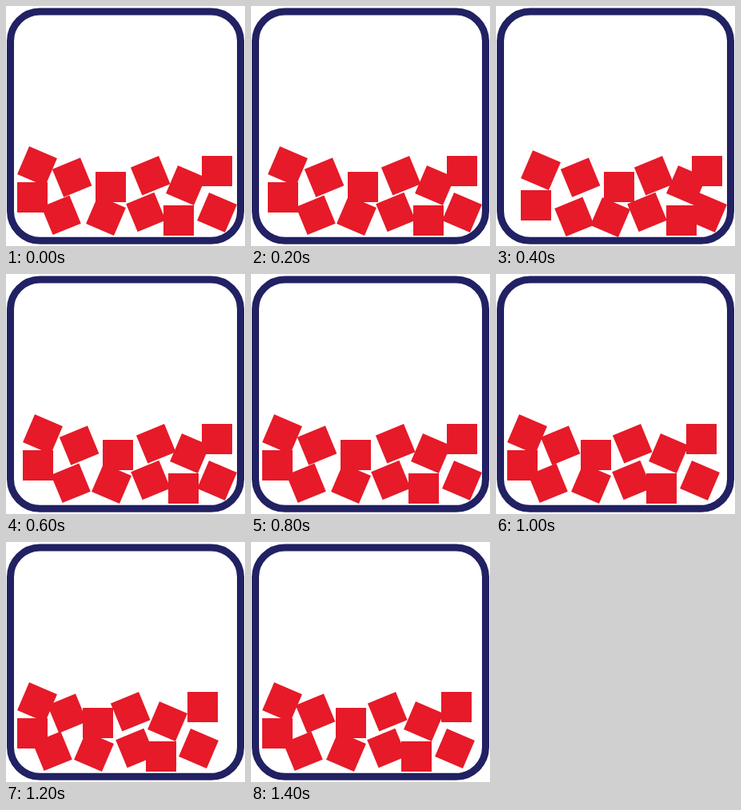
An HTML page for the animation above (1.6 s loop, 299 by 301 pixels).

```html
<!DOCTYPE html>
<html lang="en">
<head>
<meta charset="utf-8">
<title>Sliding boxes</title>
<style>
html, body { margin: 0; width: 100%; height: 100%; overflow: hidden; background: #fff; }
svg { display: block; width: 100vw; height: 100vh; }
</style>
</head>
<body>
<svg viewBox="0 0 299 301">
  <rect x="5.5" y="7" width="288" height="287.3" rx="37" fill="#fff" stroke="#212163" stroke-width="9"/>
  <g id="pile" fill="#e61a28"></g>
</svg>
<script>
const SIZE = 38, STEP = 200;
// The pile leans right, returns, leans left, returns
const LEANS = [0, 0.4, 1, 0.4, 0, -0.4, -1, -0.4];
const CW = 23.2, CCW = -22.3, FLAT = 0;

// Resting centre, tilt, reach when leaning fully right and left, sink at full right
const box = (x, y, tilt, right, left, sink = 0) => ({ x, y, tilt, right, left, sink });
const boxes = [
  box(39, 201, CW, 17, 0, 5),
  box(33, 240, FLAT, 17, 0, 10),
  box(82.6, 215, CCW, 23, 6),
  box(69, 262.3, CCW, 29, 11, 2),
  box(131, 227, FLAT, 23, 16),
  box(125, 263, CW, 18, 15, 2),
  box(180.7, 212.8, CCW, 17, 25),
  box(175, 258.5, CCW, 14, 13),
  box(216, 269, FLAT, 16, 22),
  box(225, 225, CW, 13, 23),
  box(264, 207, FLAT, 0, 18),
  box(264, 259, CW, 0, 23),
];

const pile = document.getElementById("pile");
for (const b of boxes) {
  b.rect = document.createElementNS("http://www.w3.org/2000/svg", "rect");
  for (const k of ["x", "y"]) b.rect.setAttribute(k, -SIZE / 2);
  for (const k of ["width", "height"]) b.rect.setAttribute(k, SIZE);
  pile.append(b.rect);
}

function draw(time) {
  const lean = LEANS[Math.floor(time / STEP) % LEANS.length];
  for (const b of boxes) {
    const x = b.x + Math.round(lean * (lean > 0 ? b.right : b.left));
    const y = b.y + (lean === 1 ? b.sink : 0);
    b.rect.setAttribute("transform", `translate(${x} ${y}) rotate(${b.tilt})`);
  }
}

const start = performance.now();
function tick() {
  draw(performance.now() - start);
  requestAnimationFrame(tick);
}
tick();
</script>
</body>
</html>
```
